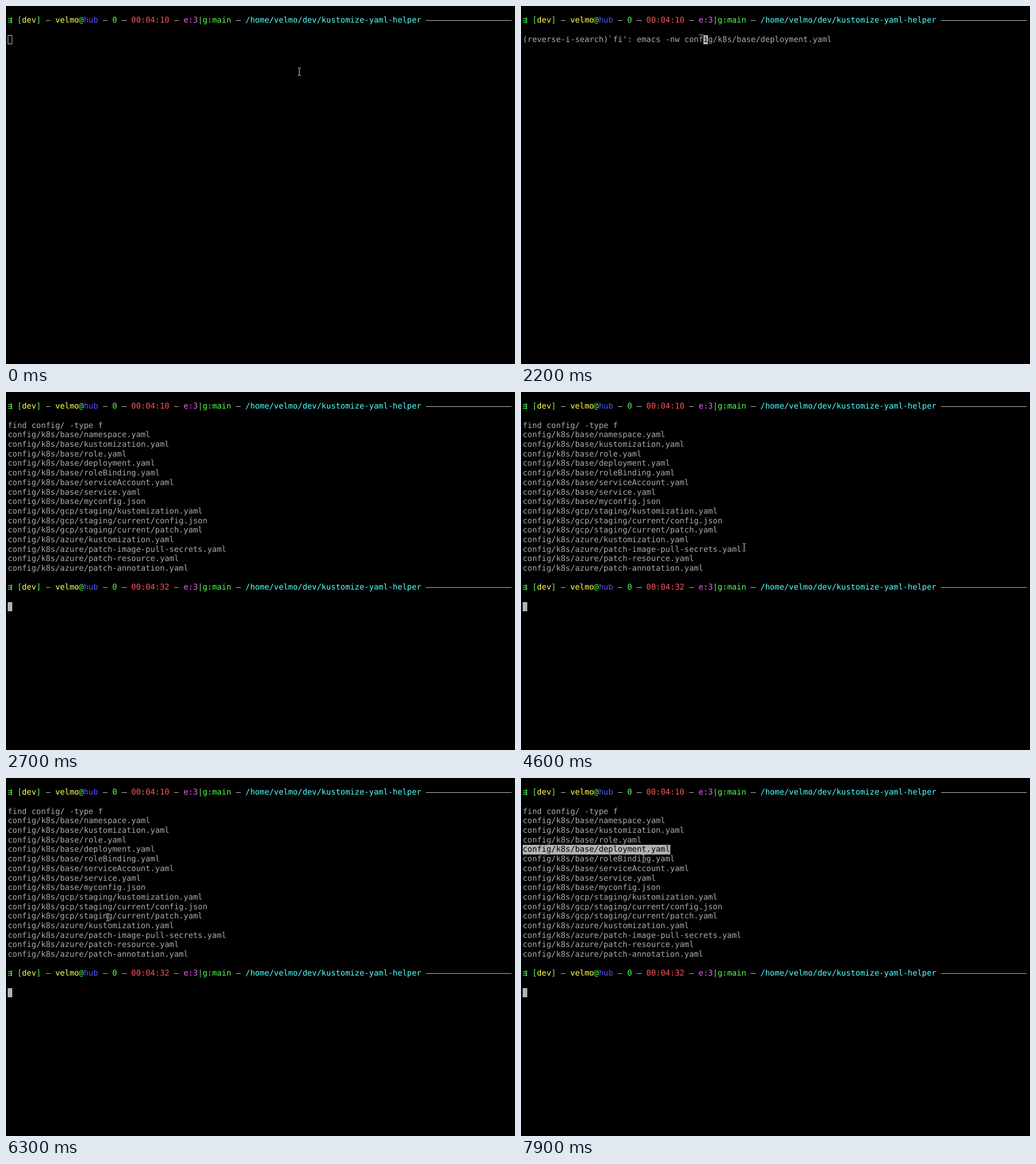
Animation, 893 px wide and 627 px high, one loop 8000 ms. Source, as an HTML page:

```html
<!DOCTYPE html>
<html lang="en">
<head>
<meta charset="utf-8">
<title>Terminal</title>
<style>
  :root { --cw: 8.34px; --ch: 16.68px; --fg: #aaa; }
  html, body { margin: 0; width: 100%; height: 100%; overflow: hidden; background: #000; }
  #stage {
    position: relative; width: 893px; height: 627px; overflow: hidden;
    background: #000; color: var(--fg);
    font: 13.9px/var(--ch) "DejaVu Sans Mono", monospace;
    letter-spacing: calc(var(--cw) - 1ch);
    text-rendering: geometricPrecision;
    font-variant-ligatures: none;
  }
  .row { position: absolute; left: 3px; height: var(--ch); white-space: pre; }
  .g { color: #5f5; } .y { color: #ff5; } .b { color: #55f; }
  .r { color: #f55; } .m { color: #f5f; } .c { color: #5ff; }
  .w { color: #bbb; }
  .cell { display: inline-block; width: var(--cw); }
  .rule { display: inline-block; position: relative; height: var(--ch); vertical-align: top; }
  .rule::after {
    content: ""; position: absolute; left: 0; right: 0; top: 7.6px;
    height: 1px; background: currentColor;
  }
  .inv { display: inline-block; height: var(--ch); background: #b2b2b2; color: #000; vertical-align: top; }
  .hollow {
    display: inline-block; box-sizing: border-box; vertical-align: top;
    width: 8px; height: 16px; border: 1px solid #bbb;
  }
  .over { display: inline-block; height: var(--ch); vertical-align: top; box-shadow: 0 -1px #aaa; }
  #mouse { position: absolute; left: 0; top: 0; }
</style>
</head>
<body>
<div id="stage">
  <div id="screen"></div>
  <svg id="mouse" width="7" height="14" fill="none" shape-rendering="crispEdges">
    <path d="M3.5 1V13" stroke="#000" stroke-width="3"/>
    <path d="M1 .5H3M4 .5H6M3.5 1V13M1 13.5H3M4 13.5H6" stroke="#ddd"/>
  </svg>
</div>
<script>
const LOOP = 8000, STEP = 100, CW = 8.34, CH = 16.68, TOP = 0.7;
const screenEl = document.getElementById('screen');
const mouseEl = document.getElementById('mouse');

const span = (cls, text) => `<span class="${cls}">${text}</span>`;
const row = (n, html) => `<div class="row" style="top:${(TOP + n * CH).toFixed(2)}px">${html}</div>`;
const rule = (cls, cells) => `<span class="rule ${cls}" style="width:${cells * CW}px"></span>`;
const block = span('inv cell', ' ');

function prompt(n, time, line) {
  const parts = [
    span('g cell', '⇶') + ' ' + span('g', '[') + span('y', 'dev') + span('g', ']'),
    span('y', 'velmo') + span('g', '@') + span('b', 'hub'),
    span('g', '0'),
    span('r', time),
    span('m', 'e:3') + span('g', '|g:main'),
    span('c', '/home/velmo/dev/kustomize-yaml-helper')
  ];
  return row(n, parts.join(` ${rule(line, 1)} `) + ' ' + rule(line, 18));
}

const files = [
  ...['namespace.yaml', 'kustomization.yaml', 'role.yaml', 'deployment.yaml',
    'roleBinding.yaml', 'serviceAccount.yaml', 'service.yaml', 'myconfig.json'].map(f => 'base/' + f),
  ...['kustomization.yaml', 'current/config.json', 'current/patch.yaml'].map(f => 'gcp/staging/' + f),
  ...['kustomization', 'patch-image-pull-secrets', 'patch-resource', 'patch-annotation']
    .map(f => `azure/${f}.yaml`)
].map(f => 'config/k8s/' + f);

const found = 'find config/ -type f';
const edited = 'emacs -nw config/k8s/base/deployment.yaml';

// The text cursor sits on the first matched letter, so only the rest looks inverted.
function search(query) {
  const head = "(reverse-i-search)`" + query + "': ";
  if (!query) return head + block;
  const hit = query.length > 2 ? found : edited;
  const at = hit.indexOf(query), end = at + query.length;
  const rest = query.slice(1);
  return head + hit.slice(0, at) + span('over', hit[at]) +
    (rest && span('inv', rest)) + hit.slice(end);
}

function commandLine(t) {
  if (t < 1400) return '<span class="hollow"></span>';
  if (t < 1700) return block;
  if (t < 2100) return search('');
  return search('find'.slice(0, Math.min(4, (t - 2000) / STEP)));
}

function render(t) {
  let html = prompt(1, '00:04:10', 'w');
  if (t < 2700) return html + row(3, commandLine(t));
  html += row(3, found);
  files.forEach((f, i) => {
    html += row(4 + i, i === 3 && t >= 7600 ? span('inv', f) : f);
  });
  return html + prompt(20, '00:04:32', 'g') + row(22, block);
}

// time, x, y of the pointer
const path = [
  [3700, 580, 123], [4200, 470, 200], [4400, 405, 246], [4500, 413, 249],
  [4600, 391, 272], [5000, 270, 140], [5300, 191, 65], [5400, 191, 93],
  [6300, 178, 244], [6400, 175, 258], [6700, 185, 298], [7000, 224, 200],
  [7200, 208, 139], [7300, 208, 123], [7600, 208, 123], [7900, 214, 141]
];

function pointer(t) {
  if (t < 1800) return [t < 1300 ? 514 : 515, 115];
  if (t < path[0][0]) return null;
  const i = path.findIndex(p => p[0] >= t);
  if (path[i][0] === t) return path[i].slice(1);
  const [t0, x0, y0] = path[i - 1], [t1, x1, y1] = path[i];
  const k = (t - t0) / (t1 - t0);
  return [Math.round(x0 + (x1 - x0) * k), Math.round(y0 + (y1 - y0) * k)];
}

let shown = -1, markup = '';
function frame() {
  const t = Math.floor(performance.now() % LOOP / STEP) * STEP;
  if (t !== shown) {
    shown = t;
    const html = render(t);
    if (html !== markup) screenEl.innerHTML = markup = html;
    const p = pointer(t);
    mouseEl.style.display = p ? 'block' : 'none';
    if (p) mouseEl.style.transform = `translate(${p[0] - 3}px,${p[1] - 7}px)`;
  }
  requestAnimationFrame(frame);
}
frame();
</script>
</body>
</html>
```
